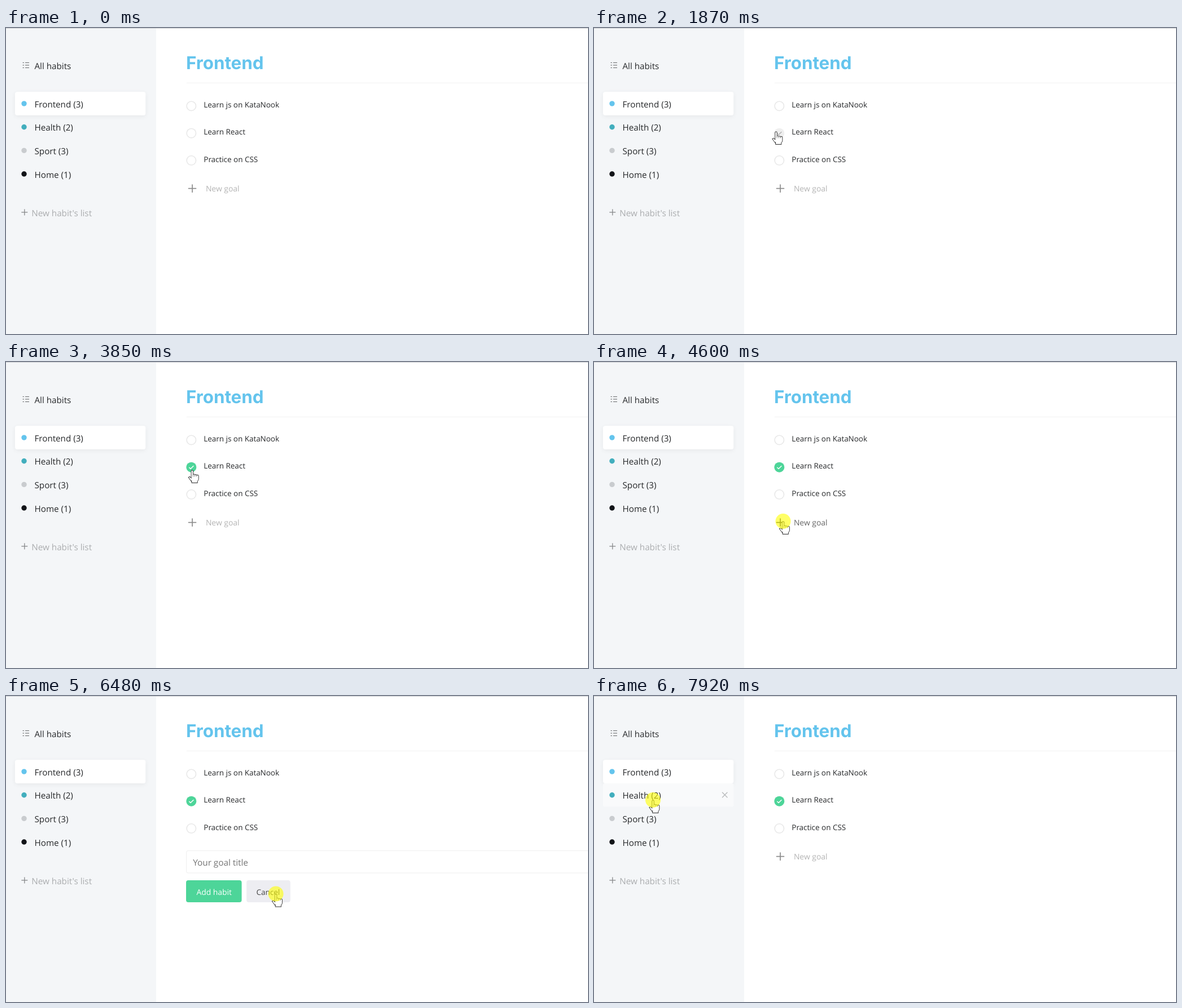
Animation, 1031 px wide and 543 px high, one loop 8 s. Source, as an HTML page with a canvas:

```html
<!DOCTYPE html>
<html lang="en">
<head>
<meta charset="utf-8">
<title>Habits</title>
<style>
  html, body { margin: 0; width: 100%; height: 100%; overflow: hidden; background: #fff; }
  canvas { display: block; width: 100%; height: 100%; }
</style>
</head>
<body>
<canvas id="stage" width="1031" height="543"></canvas>
<script>
const ctx = document.getElementById('stage').getContext('2d');
const LOOP = 8000, STEP = 70;
const BLUE = '#64c4ed', GREEN = '#4dd599', INK = '#27292b';

const lists = [
  ['Frontend (3)', BLUE],
  ['Health (2)', '#42aebd'],
  ['Sport (3)', '#c9cccf'],
  ['Home (1)', '#121418']
];
const goals = ['Learn js on KataNook', 'Learn React', 'Practice on CSS'];
const ROW_TOP = 113.3, ROW_H = 41.65;
const GOAL_X = 328.3, GOAL_TOP = 138.4, GOAL_GAP = 48.3;

// Each move bends from the previous resting place through `via` to `to`.
const moves = [
  { from: 200, until: 970, via: [633, 479], to: [449, 409] },
  { from: 970, until: 1870, via: [316, 288], to: [322.5, 183.5], slow: true },
  { from: 1950, until: 2770, via: [326, 89], to: [329.5, 182.5] },
  { from: 3720, until: 4470, via: [331, 230], to: [335, 282.5] },
  { from: 4990, until: 5200, via: [365, 292], to: [400, 304] },
  { from: 5530, until: 6080, via: [406, 341], to: [477, 358] },
  { from: 6210, until: 6420, via: [478, 355], to: [478, 351] },
  { from: 6760, until: 7670, via: [397, 341], to: [104.5, 184.5], slow: true }
];
const ENTRY = [818, 381];
const clicks = [[3170, 3370], [4600, 4730], [6480, 6620], [7920, LOOP]];
const [, [, opened], [, closed]] = clicks;

const within = (v, a, b) => v >= a && v < b;
const clamp = v => Math.max(0, Math.min(1, v));

function pointerAt(t) {
  if (t < moves[0].from) return null;
  const i = moves.findLastIndex(m => m.from <= t);
  const { from, until, via, to, slow } = moves[i];
  const start = i ? moves[i - 1].to : ENTRY;
  const shown = t < until ? Math.floor((t - from) / STEP) * STEP : until - from;
  let u = clamp(shown / (until - from));
  if (slow) u = 1 - (1 - u) ** 2;
  const [x, y] = [0, 1].map(n =>
    (1 - u) ** 2 * start[n] + 2 * u * (1 - u) * via[n] + u * u * to[n]);
  return { x, y };
}

function hoverAt(p, open) {
  if (!p) return {};
  const { x, y } = p;
  const row = Math.floor((y - ROW_TOP) / ROW_H);
  if (within(x, 16, 247) && within(row, 0, lists.length)) return { row, hand: true };
  const goal = goals.findIndex((_, i) =>
    Math.hypot(x - GOAL_X, y - GOAL_TOP - i * GOAL_GAP) < 9.3);
  if (goal >= 0) return { goal, hand: true };
  if (open) {
    const button = within(x, 319, 417) || within(x, 426, 503);
    return { input: x >= 319 && within(y, 274, 314), hand: button && within(y, 327, 366) };
  }
  const add = within(x, 319, 414) && within(y, 275, 297);
  return { add, hand: add };
}

function text(str, x, y, size, color, font = '400', family = '"Open Sans", sans-serif') {
  ctx.font = `${font} ${size}px ${family}`;
  ctx.fillStyle = color;
  ctx.fillText(str, x, y);
}

function box(x, y, w, h, r, fill) {
  ctx.beginPath();
  ctx.roundRect(x, y, w, h, r);
  ctx.fillStyle = fill;
  ctx.fill();
}

function disc(x, y, r, fill) {
  ctx.beginPath();
  ctx.arc(x, y, r, 0, 7);
  ctx.fillStyle = fill;
  ctx.fill();
}

function line(color, width, x, y, ...steps) {
  ctx.strokeStyle = color;
  ctx.lineWidth = width;
  ctx.beginPath();
  ctx.moveTo(x, y);
  for (const [dx, dy] of steps) ctx.lineTo(x += dx, y += dy);
  ctx.stroke();
}

function plus(x, y, r, color, width) {
  line(color, width, x - r, y, [2 * r, 0]);
  line(color, width, x, y - r, [0, 2 * r]);
}

function cross(x, y, r, color) {
  line(color, 1.4, x - r, y - r, [2 * r, 2 * r]);
  line(color, 1.4, x + r, y - r, [-2 * r, 2 * r]);
}

function check(y, color) {
  line(color, 1.5, GOAL_X - 4, y + .3, [2.7, 2.5], [5.4, -5.3]);
}

function sidebar(hover) {
  ctx.fillStyle = '#f4f6f8';
  ctx.fillRect(0, 0, 266, 543);
  for (let i = 0; i < 3; i++) {
    const y = 61.5 + i * 4.5;
    line('#77797b', 1.2, 29.5, y, [2.5, 0]);
    line('#77797b', 1.2, 34, y, [7, 0]);
  }
  text('All habits', 50.5, 72.8, 15.2, INK);

  ctx.save();
  ctx.shadowColor = 'rgba(0,0,0,.06)';
  ctx.shadowBlur = 9;
  ctx.shadowOffsetY = 2;
  box(16, ROW_TOP, 231.3, ROW_H, 4, '#fff');
  ctx.restore();

  lists.forEach(([name, color], i) => {
    const y = ROW_TOP + i * ROW_H;
    if (i && hover.row === i) {
      box(16, y, 231.3, ROW_H, 3, '#f9fafb');
      cross(231.7, y + 20.6, 4.7, '#b9bbbd');
    }
    disc(32, y + 20.8, 4.7, color);
    text(name, 50.5, y + 27.4, 15.2, INK);
  });

  plus(32.8, 327, 5.5, '#86888a', 1.3);
  text("New habit's list", 45.2, 334, 15.25, '#abadaf');
}

function goalList(t, hover) {
  goals.forEach((name, i) => {
    const y = GOAL_TOP + i * GOAL_GAP;
    if (hover.goal === i) {
      disc(GOAL_X, y, 9, '#efefef');
      check(y, '#b2b2b2');
    } else {
      disc(GOAL_X, y, 9, '#e8e8e8');
      disc(GOAL_X, y, 7.4, '#fff');
    }
    if (i === 1) {
      ctx.globalAlpha = clamp((t - 3300) / 210);
      disc(GOAL_X, y, 9, GREEN);
      check(y, '#fff');
      ctx.globalAlpha = 1;
    }
    text(name, 350.3, y + 2.6, 13.45, INK);
  });
}

function form() {
  box(319, 274, 730, 40.5, 4, '#efefef');
  box(320, 275, 728, 38.5, 3, '#fff');
  text('Your goal title', 331.2, 300.8, 15.3, '#757575');
  box(319, 327, 98.5, 39, 4, GREEN);
  text('Add habit', 337.5, 353, 13.85, '#fff');
  box(426, 327, 77.7, 39, 4, '#ededf2');
  text('Cancel', 443.5, 353, 13.5, '#444');
}

function handShape() {
  const path = new Path2D();
  for (let i = 0; i < 4; i++) {
    const top = i ? 7.4 + i * .7 : 1;
    path.roundRect(-1.3 + i * 3.2, top, 2.6, 14 - top, 1.2);
  }
  path.roundRect(-1.3, 12, 12.2, 8, [0, 0, 4, 3]);
  path.rect(-.4, 18, 9.3, 4.6);
  path.addPath(new Path2D('M-1.3 15.5L-4.4 12.5L-6 13.4L-1.3 20Z'));
  return path;
}

const hand = handShape();
const arrow = new Path2D('M1 2V16.2L4.7 12.9L7.4 19.1L9 18.4L6.4 12.2H11.2Z');

function pointer(p, hover) {
  ctx.save();
  ctx.translate(p.x, p.y);
  if (hover.input) {
    line('#222', 1.1, 0, -9, [0, 18]);
    for (const y of [-9, 9]) line('#222', 1.1, -2.5, y, [5, 0]);
  } else {
    const shape = hover.hand ? hand : arrow;
    ctx.strokeStyle = '#2c2c2c';
    ctx.lineWidth = 1.8;
    ctx.stroke(shape);
    ctx.fillStyle = '#fff';
    ctx.fill(shape);
  }
  ctx.restore();
}

function draw(t) {
  const open = within(t, opened, closed);
  const p = pointerAt(t);
  const hover = hoverAt(p, open);

  ctx.fillStyle = '#fff';
  ctx.fillRect(0, 0, 1031, 543);
  sidebar(hover);
  text('Frontend', 319, 72.8, 31.3, BLUE, '700', 'Inter, sans-serif');
  ctx.fillStyle = '#f2f2f2';
  ctx.fillRect(320, 97, 711, 1);
  goalList(t, hover);

  if (open) {
    form();
  } else {
    plus(330, 284.7, 7.2, hover.add ? '#4a4a4a' : '#8c8c8c', 1.7);
    text('New goal', 353.9, 290.4, 13.9, hover.add ? '#666' : '#b4b4b4');
  }
  ctx.fillStyle = '#cdd0d3';
  ctx.fillRect(0, 0, 1031, 1);

  if (p) pointer(p, hover);
  if (clicks.some(([a, b]) => within(t, a, b))) disc(p.x, p.y, 13.5, 'rgba(255,255,0,.6)');
}

ctx.textRendering = 'geometricPrecision';
const begin = performance.now();
function tick() {
  draw((performance.now() - begin) % LOOP);
  requestAnimationFrame(tick);
}
tick();
</script>
</body>
</html>
```
